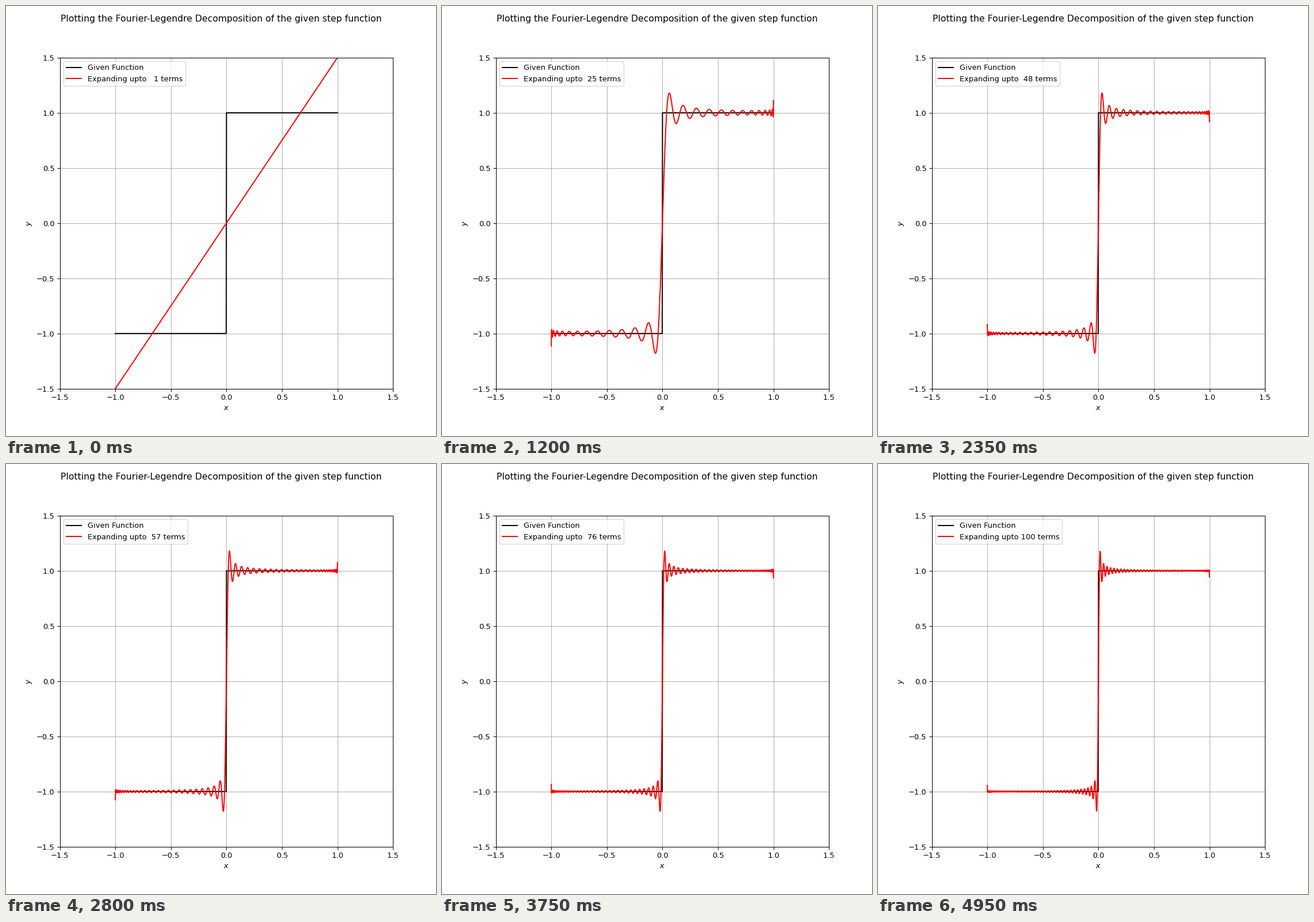
A matplotlib script that plays this animation: 748 by 748 pixels, repeating every 5000 ms.

```python
import numpy as np
import matplotlib.pyplot as plt
from matplotlib.animation import FuncAnimation

TERMS = 100
INCHES, DPI = 8, 93.5  # 748 px square


def legendre(x, top):
    """Values of P_0 .. P_top at x, by Bonnet's recurrence."""
    p = [np.ones_like(x), x]
    for n in range(1, top):
        p.append(((2 * n + 1) * x * p[n] - n * p[n - 1]) / (n + 1))
    return np.array(p)


def partial_sums(x):
    """Row k holds the step's expansion over its first k + 1 odd terms."""
    top = 2 * TERMS
    at_zero = legendre(np.zeros(1), top)[:, 0]
    odd = np.arange(1, top, 2)
    coef = at_zero[odd - 1] - at_zero[odd + 1]
    return np.cumsum(coef[:, None] * legendre(x, top)[odd], axis=0)


x = np.linspace(-1, 1, 1000)
sums = partial_sums(x)

plt.rcParams["font.family"] = "DejaVu Sans"
fig, ax = plt.subplots(figsize=(INCHES, INCHES), dpi=DPI)
fig.suptitle("Plotting the Fourier-Legendre Decomposition of the given step function")
ax.set(xlim=(-1.5, 1.5), ylim=(-1.5, 1.5), xlabel="$x$", ylabel="$y$")
ax.grid(True)

ax.plot(x, np.sign(x), "k", label="Given Function")
curve, = ax.plot(x, sums[0], "r", label="Expanding upto   1 terms")
label = ax.legend(loc="upper left").get_texts()[1]


def update(i):
    curve.set_ydata(sums[i])
    label.set_text(f"Expanding upto {i + 1:3d} terms")
    return curve, label


anim = FuncAnimation(fig, update, frames=TERMS, interval=50, repeat=True, repeat_delay=0)
plt.show()
```
